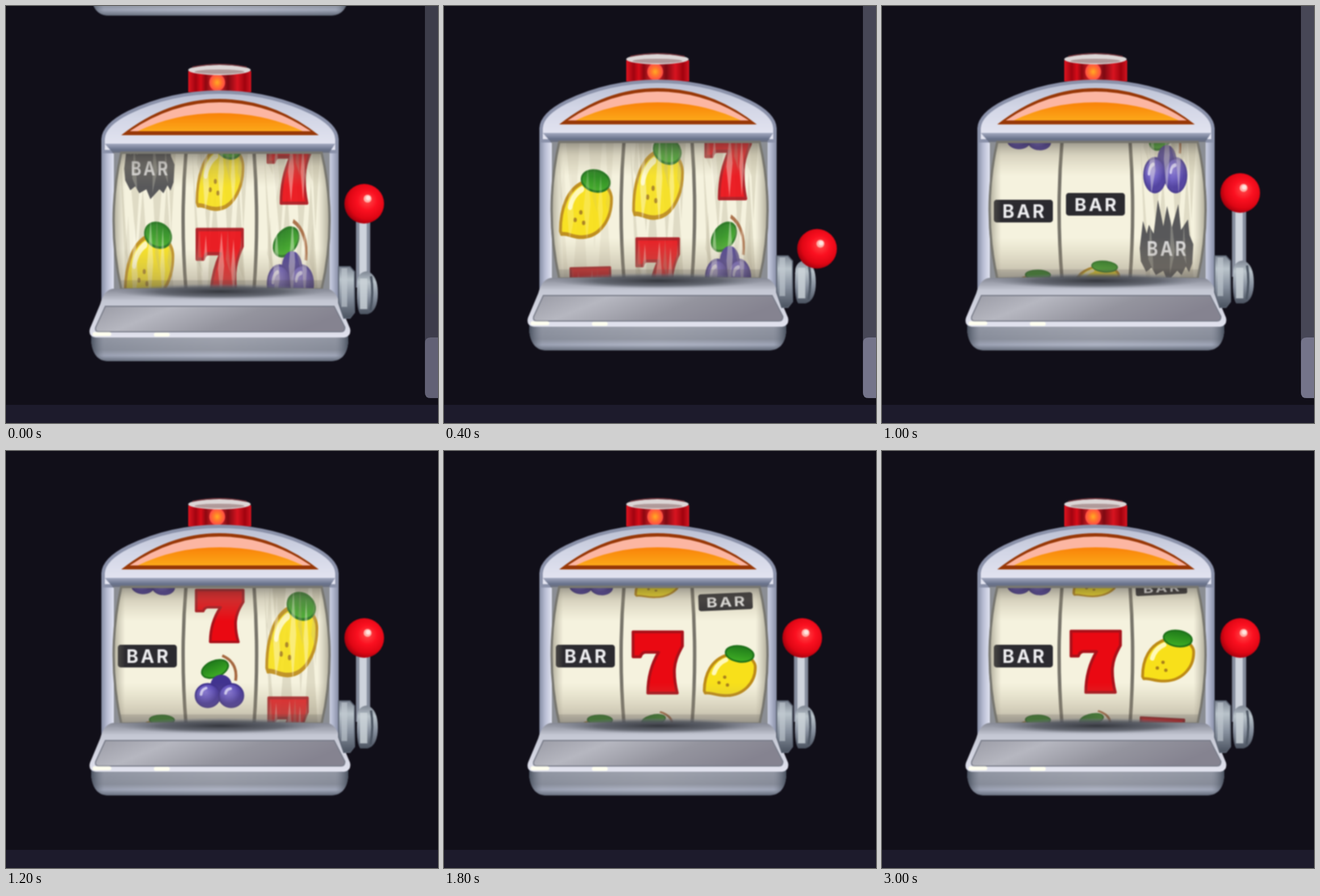
Animation, 761 px wide and 736 px high, one loop 3.4 s. Source, as an HTML page:

```html
<!DOCTYPE html>
<html lang="en">
<head>
<meta charset="utf-8">
<title>Slot machine</title>
<style>
  html, body { margin: 0; width: 100%; height: 100%; overflow: hidden; background: #110f19; }
  svg { display: block; width: 761px; height: 736px; }
  .soft { filter: blur(1.2px); }
  text { font: 700 32px Inter, "Open Sans", sans-serif; letter-spacing: 4px; text-anchor: middle; fill: #eeeef0; }
</style>
</head>
<body>
<svg viewBox="0 0 761 736">
  <defs>
    <linearGradient id="post">
      <stop offset="0" stop-color="#858ca4"/><stop offset=".025" stop-color="#b9bed4"/>
      <stop offset=".05" stop-color="#dcdfee"/><stop offset=".95" stop-color="#dcdfee"/>
      <stop offset=".975" stop-color="#b4bad0"/><stop offset="1" stop-color="#858ca4"/>
    </linearGradient>
    <linearGradient id="arch" x2="0" y2="1">
      <stop offset="0" stop-color="#b9bfd2"/><stop offset=".45" stop-color="#d3d6e6"/><stop offset="1" stop-color="#e6e7f3"/>
    </linearGradient>
    <linearGradient id="beam" x2="0" y2="1">
      <stop offset="0" stop-color="#a3a9c0"/><stop offset=".6" stop-color="#68718a"/><stop offset="1" stop-color="#6d7079"/>
    </linearGradient>
    <linearGradient id="orange" x2="0" y2="1">
      <stop offset="0" stop-color="#f98208"/><stop offset="1" stop-color="#fca819"/>
    </linearGradient>
    <linearGradient id="glass">
      <stop offset="0" stop-color="#e01420"/><stop offset=".12" stop-color="#a00410"/>
      <stop offset=".2" stop-color="#d80c18"/><stop offset=".28" stop-color="#8c0710"/>
      <stop offset=".45" stop-color="#f03030"/><stop offset=".63" stop-color="#7c0912"/>
      <stop offset=".78" stop-color="#d81420"/><stop offset=".9" stop-color="#a0030e"/><stop offset="1" stop-color="#d41420"/>
    </linearGradient>
    <radialGradient id="glow">
      <stop offset="0" stop-color="#ffad25"/><stop offset=".45" stop-color="#ff7a2c"/><stop offset="1" stop-color="#ff4a45"/>
    </radialGradient>
    <linearGradient id="shade" x2="0" y2="1">
      <stop offset="0" stop-color="#403c38" stop-opacity=".5"/><stop offset=".1" stop-color="#8c8470" stop-opacity=".28"/>
      <stop offset=".25" stop-color="#a89f80" stop-opacity="0"/><stop offset=".7" stop-color="#a89f80" stop-opacity="0"/>
      <stop offset=".92" stop-color="#877c6a" stop-opacity=".35"/><stop offset="1" stop-color="#3e3b3c" stop-opacity=".45"/>
    </linearGradient>
    <linearGradient id="round">
      <stop offset="0" stop-color="#6e6a5c" stop-opacity=".6"/><stop offset=".06" stop-color="#8f8a78" stop-opacity="0"/>
      <stop offset=".94" stop-color="#8f8a78" stop-opacity="0"/><stop offset="1" stop-color="#6e6a5c" stop-opacity=".6"/>
    </linearGradient>
    <linearGradient id="lip" x2="0" y2="1">
      <stop offset="0" stop-color="#858894"/><stop offset=".25" stop-color="#c4c7d3"/><stop offset="1" stop-color="#e2e3ef"/>
    </linearGradient>
    <radialGradient id="slot">
      <stop offset="0" stop-color="#34363c"/><stop offset=".6" stop-color="#555962" stop-opacity=".8"/>
      <stop offset="1" stop-color="#787c88" stop-opacity="0"/>
    </radialGradient>
    <linearGradient id="tray" x2="1" y2=".25">
      <stop offset="0" stop-color="#9a9ba5"/><stop offset=".3" stop-color="#b6b7c0"/>
      <stop offset=".65" stop-color="#94949e"/><stop offset="1" stop-color="#858390"/>
    </linearGradient>
    <linearGradient id="box" x2="0" y2="1">
      <stop offset="0" stop-color="#999da9"/><stop offset=".6" stop-color="#858995"/>
      <stop offset=".8" stop-color="#a9afc2"/><stop offset="1" stop-color="#4d5563"/>
    </linearGradient>
    <linearGradient id="boxSide">
      <stop offset="0" stop-color="#49515f"/><stop offset=".05" stop-color="#8a91a0" stop-opacity=".4"/>
      <stop offset=".5" stop-color="#c0c3cc" stop-opacity=".25"/>
      <stop offset=".95" stop-color="#8a91a0" stop-opacity=".3"/><stop offset="1" stop-color="#49515f"/>
    </linearGradient>
    <linearGradient id="steel" x2="0" y2="1">
      <stop offset="0" stop-color="#7d8592"/><stop offset=".25" stop-color="#b9c3ca"/>
      <stop offset=".6" stop-color="#87909e"/><stop offset="1" stop-color="#4a525f"/>
    </linearGradient>
    <radialGradient id="ball" cx=".58" cy=".42" r=".62">
      <stop offset="0" stop-color="#ff4a4a"/><stop offset=".4" stop-color="#fb1020"/>
      <stop offset=".75" stop-color="#df0614"/><stop offset="1" stop-color="#9c000c"/>
    </radialGradient>
    <radialGradient id="berry" cx=".4" cy=".35">
      <stop offset="0" stop-color="#8676d8"/><stop offset=".55" stop-color="#6353c0"/><stop offset="1" stop-color="#44349c"/>
    </radialGradient>
    <linearGradient id="leaf" x2="0" y2="1">
      <stop offset="0" stop-color="#1f7a1a"/><stop offset="1" stop-color="#3fae25"/>
    </linearGradient>
    <clipPath id="window"><path id="pane" d="M203 240Q176 360 203 481H556Q584 360 556 240Z"/></clipPath>

    <g id="sym0">
      <path d="M5-49Q34-36 29-2" fill="none" stroke="#a5673f" stroke-width="5"/>
      <ellipse cx="-8" cy="-24" rx="25" ry="15" transform="rotate(-24 -8 -24)" fill="url(#leaf)" stroke="#1d7019" stroke-width="3"/>
      <circle cx="3" cy="6" r="19" fill="#41338f"/>
      <g fill="url(#berry)" stroke="#3d2f8c" stroke-width="3">
        <circle cx="-21" cy="26" r="22"/><circle cx="21" cy="26" r="22"/>
      </g>
      <path d="M-33 24Q-32 14-24 12M11 22Q12 14 20 13" fill="none" stroke="#d3cdf8" stroke-width="5" stroke-linecap="round"/>
    </g>
    <g id="sym1">
      <rect x="-52" y="-20" width="104" height="40" rx="5" fill="#2b2a2f"/>
      <text x="2" y="12">BAR</text>
    </g>
    <g id="sym2">
      <path d="M-44 36C-44 6-32-20-4-29C24-36 47-22 46-6C46 20 26 43-4 44C-22 45-32 38-42 40Z" fill="#f8e01a" stroke="#bd8a16" stroke-width="5" stroke-linejoin="round"/>
      <path d="M-27 4Q-22-13-6-20" fill="none" stroke="#fff9b8" stroke-width="8" stroke-linecap="round"/>
      <g fill="#a8801a"><circle cx="-8" cy="11" r="3"/><circle cx="-18" cy="21" r="3"/><circle cx="-3" cy="25" r="3"/></g>
      <ellipse cx="18" cy="-31" rx="25" ry="14" transform="rotate(8 18 -31)" fill="url(#leaf)" stroke="#1d7019" stroke-width="3"/>
    </g>
    <g id="sym3">
      <path d="M-43-54H44V-29C34-11 31-1 30 11Q29 31 35 54H-17C-17 26-10 2 2-18H-22Q-28-17-30-10H-43Z" fill="#ea0912" stroke="#a91019" stroke-width="5" stroke-linejoin="round"/>
    </g>
    <g id="streaks" fill="#fffdf0">
      <path d="M-26-46L-20 20L-28 50L-32 10ZM4-50L9 0L3 52L-3 5ZM27-40L31 10L27 50L22 5Z" opacity=".38"/>
      <path d="M-44-10L-38-54L-33 10ZM12-10L16-54L21 12ZM36 0L42-45L46 20Z" fill="#b9b196" opacity=".25"/>
    </g>
    <g id="smear">
      <path d="M-50 0L-44-52L-37-28L-33-45L-24-28L-16-92L-6-42L1-80L10-40L22-84L27-35L40-55L43-25L50-8L48 28L42 45L36 34L28 50L20 42L2 62L-6 42L-20 50L-28 36L-38 44L-48 24Z" fill="#58585a"/>
      <path d="M-30-60L-24 45L-34 20ZM8-66L16 5L6 50ZM32-52L37 30L30 10Z" fill="#d8d6c8" opacity=".3"/>
      <text transform="scale(1 1.2)" x="2" y="12" opacity=".85">BAR</text>
    </g>
    <path id="haze" d="M-48 240L-30 481L-38 481ZM-34 240H-10L-20 400ZM-22 481L-8 300L4 481ZM6 240H30L16 430ZM22 481L34 290L46 481ZM36 240H50L42 380Z" fill="#a79f86" opacity=".28"/>

    <g id="base">
      <path d="M150 558H603V572Q601 606 574 608H178Q153 606 150 572Z" fill="url(#box)"/>
      <path d="M150 558H603V572Q601 606 574 608H178Q153 606 150 572Z" fill="url(#boxSide)"/>
      <path d="M188 480H566Q582 483 588 507L606 550Q609 564 596 566H158Q144 564 148 550L166 507Q172 483 188 480Z" fill="url(#lip)"/>
      <ellipse cx="378" cy="485" rx="185" ry="14" fill="url(#slot)"/>
      <path d="M175 511H578L597 548Q597 556 590 556H164Q156 556 158 548Z" fill="url(#tray)" stroke="#777b88" stroke-width="2"/>
      <path d="M156 560H182M264 561H285" stroke="#fffff0" stroke-width="7" stroke-linecap="round"/>
    </g>
  </defs>

  <g id="machine" class="soft">
    <use href="#base" y="-610"/>
    <path d="M321 96V133H432V96Z" fill="url(#glass)"/>
    <ellipse cx="372" cy="116" rx="14" ry="15" fill="url(#glow)"/>
    <ellipse cx="376" cy="94" rx="55" ry="9" fill="#dcd6d6"/>
    <ellipse cx="376" cy="97" rx="44" ry="4" fill="#b09a9a"/>
    <path d="M328 89Q376 79 424 89" fill="none" stroke="#7a3a40" stroke-width="2"/>

    <path d="M168 215H586V500H168Z" fill="url(#post)"/>
    <path d="M171 238V216Q172 191 216 169Q290 133 376 133Q464 133 538 169Q582 191 583 216V238Z" fill="url(#arch)" stroke="#8b92aa" stroke-width="6"/>
    <path d="M174 224H580L568 242H190Z" fill="url(#beam)"/>
    <path d="M203 209Q284 145 376 145Q470 145 551 209Z" fill="#983807"/>
    <path d="M218 202Q293 151 376 151Q462 151 537 202Z" fill="#fcb6a2"/>
    <path d="M232 202Q298 170 376 170Q456 170 523 202Z" fill="url(#orange)"/>

    <path d="M190 240H570V490H190Z" fill="#8b8e94"/>
    <use href="#pane" fill="#f5f2de"/>
    <g clip-path="url(#window)">
      <g id="reels"></g>
      <path d="M317 240Q307 360 317 481M437 240Q446 360 437 481" fill="none" stroke="#77746a" stroke-width="6"/>
      <path d="M185 240H575V481H185Z" fill="url(#shade)"/>
      <path d="M187 240H572V481H187Z" fill="url(#round)"/>
      <path d="M185 465H575V481H185Z" fill="#5b5650" opacity=".18"/>
    </g>
    <use href="#pane" fill="none" stroke="#77766f" stroke-width="4"/>
    <use href="#base"/>

    <path d="M586 441H606L614 450V522L606 532H595L586 505Z" fill="url(#steel)" stroke="#5a6270" stroke-width="2"/>
    <path d="M596 444V512" stroke="#c4ccd3" stroke-width="10" opacity=".6"/>
    <path id="armEdge" stroke="#858c9c" stroke-width="25"/>
    <path id="armCore" stroke="#ced3dc" stroke-width="13"/>
    <path d="M619 464Q622 450 637 449Q655 456 655 488Q655 520 637 525H624Q616 515 619 464Z" fill="url(#steel)"/>
    <path d="M630 462V516" stroke="#cdd5da" stroke-width="13" opacity=".8"/>
    <path d="M643 458Q648 486 642 518" fill="none" stroke="#4c5562" stroke-width="4"/>
    <g id="knob">
      <circle r="35" fill="url(#ball)"/>
      <circle cx="6" cy="-9" r="7" fill="#ffb0a8"/><circle cx="7" cy="-10" r="4" fill="#ffe6e0"/>
    </g>
  </g>

  <path d="M0 704H761V736H0Z" fill="#1d1b2c"/>
  <g id="scroll">
    <path d="M738 0H761V692H748Q738 692 738 682Z" fill="#474756"/>
    <path d="M761 585H748Q738 585 738 595V682Q738 692 748 692H761Z" fill="#74748a"/>
  </g>
</svg>
<script>
const LOOP = 3400, STEP = 100;
const $ = id => document.getElementById(id);
const clamp = v => Math.max(0, Math.min(1, v));

// Key poses share these times. A reel's pose is the symbol index at the centre:
// it falls as the reel rolls down, overshoots its stop and springs back.
const TIMES = [0, 200, 600, 1000, 1400, 1800, 2200];
const LEVER = [0, 1, .44, 0, 0, 0, 0];
const reels = [
  { x: 249, side: -1, sharp: 450, poses: [1.57, 0, -3.06, -3, -3, -3, -3] },
  { x: 376, side: 0, sharp: 900, poses: [2.53, .8, -4, -6.9, -9.23, -9.01, -9] },
  { x: 503, side: 1, sharp: 1300, poses: [3.57, 1.75, -2.85, -7.4, -11.8, -14.2, -14] }
];
// gap: distance between symbols, lift: shift when sharp, stretch: height when blurred
const symbols = [
  { gap: 132, lift: -6, stretch: 1.6 },
  { gap: 120, lift: 0, stretch: 1 },
  { gap: 132, lift: 0, stretch: 1.65 },
  { gap: 132, lift: 10, stretch: 1.3 }
];

function make(name, attrs, parent) {
  const el = document.createElementNS("http://www.w3.org/2000/svg", name);
  for (const key in attrs) el.setAttribute(key, attrs[key]);
  return parent.appendChild(el);
}

for (const reel of reels) {
  reel.haze = make("use", { href: "#haze", x: reel.x }, $("reels"));
  reel.items = symbols.map((_, i) => {
    const group = make("g", {}, $("reels"));
    const crisp = make("use", { href: "#sym" + i }, group);
    const blurred = make("use", { href: i === 1 ? "#smear" : "#streaks" }, group);
    return { group, crisp, blurred };
  });
}

// Monotone cubic curve through the key poses
function curve(values, t) {
  const rate = n => (values[n + 1] - values[n]) / (TIMES[n + 1] - TIMES[n]);
  const last = TIMES.length - 1;
  if (t >= TIMES[last]) return values[last];
  const slope = n => {
    if (n === 0) return rate(0);
    if (n === last) return 0;
    const a = rate(n - 1), b = rate(n);
    return a * b > 0 ? 2 * a * b / (a + b) : 0;
  };
  const n = TIMES.findIndex(time => time > t) - 1;
  const span = TIMES[n + 1] - TIMES[n], u = (t - TIMES[n]) / span, v = 1 - u;
  return v * v * ((1 + 2 * u) * values[n] + u * span * slope(n))
    + u * u * ((1 + 2 * v) * values[n + 1] - v * span * slope(n + 1));
}

function drawReel(reel, t) {
  const pos = curve(reel.poses, t);
  const blur = clamp((reel.sharp - t) / 100);
  reel.haze.setAttribute("opacity", blur);
  reel.items.forEach(({ group, crisp, blurred }, i) => {
    const { gap, lift, stretch } = symbols[i];
    const mix = (sharp, fast) => sharp + (fast - sharp) * blur;
    const d = ((i - pos + 2) % 4 + 4) % 4 - 2;
    const bend = Math.min(d * d, 1.3);
    const x = reel.x - reel.side * 11 * bend;
    const y = 362 + mix(gap, 165) * d + mix(lift, 0);
    const sx = 1 - mix(.13, .35) * bend;
    const sy = mix(1, stretch) * (1 - .4 * bend);
    const tilt = reel.side * mix(3, 0) * d;
    group.setAttribute("transform", `translate(${x} ${y}) rotate(${tilt}) scale(${sx} ${sy})`);
    crisp.setAttribute("opacity", i === 1 ? 1 - blur : 1 - .1 * blur);
    blurred.setAttribute("opacity", blur);
  });
}

function drawLever(t) {
  const pull = curve(LEVER, t);
  const x = 631 + 31 * pull ** .7, y = 330 + 126 * pull;
  const arm = `M629 478L${x - 2} ${y}`;
  $("armEdge").setAttribute("d", arm);
  $("armCore").setAttribute("d", arm);
  $("knob").setAttribute("transform", `translate(${x} ${y})`);
}

function draw(now) {
  const t = Math.floor(now % LOOP / STEP) * STEP;
  $("machine").setAttribute("transform", `translate(0 ${t < 100 ? 19 : 0})`);
  $("scroll").setAttribute("opacity", t < 100 ? .82 : clamp((1200 - t) / 200));
  reels.forEach(reel => drawReel(reel, t));
  drawLever(t);
}

const start = performance.now();
function tick() {
  draw(performance.now() - start);
  requestAnimationFrame(tick);
}
tick();
</script>
</body>
</html>
```
